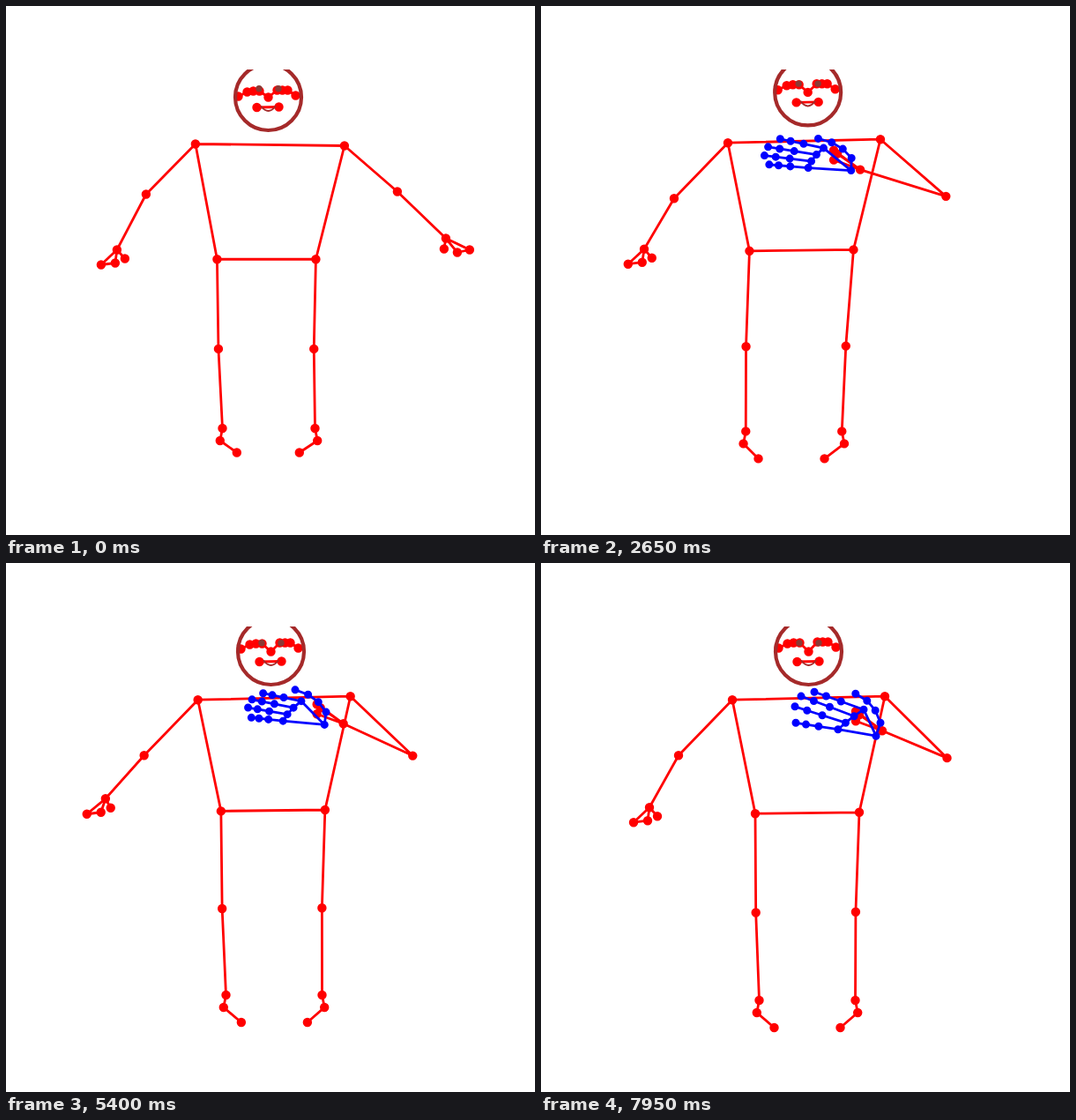
Write an HTML page that moves like this. It is 600x600 px and loops after 8 s.

```html
<!DOCTYPE html>
<html>
<head>
<meta charset="utf-8">
<style>
html, body { margin: 0; width: 100%; height: 100%; overflow: hidden; background: #fff; }
svg { display: block; width: 100vw; height: 100vh; }
path { fill: none; stroke-linecap: round; stroke-linejoin: round; }
.red { stroke: #f00; }
.blue { stroke: #00f; }
.line { stroke-width: 2.8; }
</style>
</head>
<body>
<svg viewBox="0 0 600 600">
  <clipPath id="axes"><rect x="75" y="72" width="465" height="462"/></clipPath>
  <g clip-path="url(#axes)">
    <g transform="translate(.5 .5)">
      <path id="bones" class="red line"/>
      <path id="joints" class="red" stroke-width="10.4"/>
      <g id="palm">
        <path id="fingers" class="blue line"/>
        <path id="knuckles" class="blue" stroke-width="9"/>
      </g>
      <g id="head">
        <circle r="37.5" fill="none" stroke="#a52a2a" stroke-width="4.2"/>
        <circle cx="-10.5" cy="-9.8" r="3.7" fill="#8b3a35"/>
        <circle cx="11.5" cy="-9.8" r="3.7" fill="#8b3a35"/>
        <path d="M-8 10.5Q0 20.5 8 10.5" stroke="#a52a2a" stroke-width="2"/>
      </g>
    </g>
  </g>
</svg>
<script>
const LOOP = 8000, STEP = 50, PALM_START = 1000;
const $ = id => document.getElementById(id);

const smooth = u => (u = Math.min(1, Math.max(0, u)), u * u * (3 - 2 * u));
const lerp = (a, b, u) => a + (b - a) * u;
const mix = (p, q, u) => p.map((v, i) => lerp(v, q[i], u));
const add = (p, q) => [p[0] + q[0], p[1] + q[1]];

// Eases between rows of [time, ...values].
function keys(t, rows) {
  let i = 0;
  while (i < rows.length - 2 && t >= rows[i + 1][0]) i++;
  const [a, b] = [rows[i], rows[i + 1]];
  return mix(a, b, smooth((t - a[0]) / (b[0] - a[0]))).slice(1);
}

// time, foot sway, foot drop, nose x, right wrist from shoulder, palm turn, finger length
const beats = [
  [1800, -9.5, -9, 304, -22, 33, 0, .97],
  [3600, -22, -19, 300, -24, 36, .2, .975],
  [4650, -15, -8.5, 296, -17, 38, .5, 1.02],
  [5400, 2, -6, 300, -8, 31, .35, .88],
  [6700, 4, -.5, 303, -13, 29, .75, .97],
  [7950, 0, 0, 303, -3, 39, 1, 1]
];
const raiseKeys = [[0, 0], [450, -.08], [1150, 1]];
const swingKeys = [[0, 0], [1250, .85], [1800, .05], [4650, 0], [5400, .45], [6700, 1], [7650, .9], [7950, 0]];
const flickKeys = [[3350, 0], [3550, 1], [3650, 1], [4000, 0]];

// Hand points relative to the wrist: pinky, index, thumb.
const hang = [[-18, 17], [-2, 15], [9, 10]];
const flicked = [[36, -25], [30, -14], [22, -7]];
const open = [[27, 13], [13, 16], [-2, 12]];
const folded = [[-30, -22], [-26, -18], [-30, -11]];

const brow = [[-34, -4], [-24, -9], [-17, -10], [-10, -10], [0, 0], [10, -11], [16, -11], [22, -11], [31, -5]];
const mouth = [[-13, 11.5], [12, 11]];

const arm = (shoulder, elbow, wrist, hand) => {
  const [pinky, index, thumb] = hand.map(p => add(wrist, p));
  return [shoulder, elbow, wrist, pinky, index, wrist, thumb];
};

function leg(side, shoulder, hip, ankle, lean, fresh) {
  const knee = add(mix(hip, ankle, .53), [-1.7, 0]);
  const heel = add(ankle, [side * 2.7, 14]);
  const toe = add(ankle, [-side * 17 + lean + fresh, 31 - 3.5 * fresh]);
  return [shoulder, hip, knee, ankle, heel, toe];
}

// Four straight fingers fan out over a curved row of knuckles.
function palmChains(base, q, size) {
  const rows = [0, 1, 2, 3].map(i => {
    const knuckle = [-33 + 19 * q - (9 + 2.5 * q) * i + (1.2 - .6 * q) * i * i, -25 - 5 * q + 7.5 * i];
    const tip = [
      (-84 + 14 * q - 19 * i + (5 - q) * i * i) * size,
      (-35.5 - 14.5 * q + (9.8 - 8.3 * q) * i + 3.4 * q * i * i) * size
    ];
    return [0, .46, .76, 1].map(u => add(base, mix(knuckle, tip, u)));
  });
  const thumb = [0, 1, 2, 3].map(j => add(base, [
    5 * q - (9 - 5 * q) * j - (1.3 + .5 * q) * j * j,
    -14 - q - (11.5 + 4 * q) * j + 1.5 * j * j
  ]));
  return [[base, ...thumb], [base, ...rows.map(r => r[0]), base], ...rows];
}

const poly = pts => "M" + pts.map(p => p[0].toFixed(2) + " " + p[1].toFixed(2)).join("L");
const dot = p => poly([p]) + "h.01";
function show(lineId, dotId, chains) {
  $(lineId).setAttribute("d", chains.map(poly).join(""));
  $(dotId).setAttribute("d", chains.flat().map(dot).join(""));
}

function draw(t) {
  const [sway, drop, noseX, wristX, wristY, turn, size] = keys(t, beats);
  const [raise] = keys(t, raiseKeys), [swing] = keys(t, swingKeys), [flick] = keys(t, flickKeys);
  const fresh = 1 - smooth(t / 1000);

  // Pairs of joints sit either side of a swaying spine.
  const pair = (x, y, half, tilt) => [[x - half, y - tilt], [x + half, y + tilt]];
  const [shoulderL, shoulderR] =
    pair(303 + .33 * sway - fresh, 152.7 + 4.3 * fresh, 86.5 - 2 * fresh, -2 + 3 * fresh);
  const [hipL, hipR] =
    pair(301.5 + .43 * sway - 2.5 * fresh, 283 + .47 * drop + 8 * fresh, 59 - 3 * fresh, -.7 + .7 * fresh);
  const [ankleL, ankleR] =
    pair(301.5 + sway + 5.5 * fresh, 495.5 + drop - 8 * fresh, 54.5 - 2 * fresh, 0);

  const elbowL = add(shoulderL, [-61 + 5 * fresh, 63 - 6 * fresh]);
  const low = [-33 - 24 * swing, 59 + 4 * fresh - 40 * swing * (1 - swing)];
  const wristL = add(elbowL, mix(low, [38, -24], flick));
  const handL = hang.map((p, i) => mix(add(p, [-7 * swing, swing]), flicked[i], flick));

  const out = 70.5 + 30 * Math.exp((1000 - t) / 800);
  const elbowR = add(shoulderR, mix([60, 52], [out, 62 + t / 1000], raise));
  const wristR = add(shoulderR, mix([115, 105], [wristX, wristY], raise));
  const handR = open.map((p, i) => mix(p, folded[i], raise));

  const nose = [noseX - 7 * fresh, 97 + 3 * smooth((t - 1800) / 3600) + 6 * fresh];
  const lift = [0, 1.5 * (1 - turn) + 1.5 * fresh];
  const lean = sway * .18;

  show("bones", "joints", [
    arm(shoulderL, elbowL, wristL, handL),
    arm(shoulderR, elbowR, wristR, handR),
    leg(-1, shoulderL, hipL, ankleL, lean, fresh),
    leg(1, shoulderR, hipR, ankleR, lean, fresh),
    [shoulderL, shoulderR], [hipL, hipR],
    brow.map((p, i) => add(nose, i === 4 ? p : add(p, lift))),
    mouth.map(p => add(nose, p))
  ]);
  $("head").setAttribute("transform", `translate(${nose[0]} ${nose[1]})`);

  $("palm").style.display = t >= PALM_START ? "" : "none";
  const base = add(wristR, [-7 - 120 * (1 - size), 1 + 5 * turn ** 3]);
  show("fingers", "knuckles", palmChains(base, turn, size));
}

const start = performance.now();
function tick(now) {
  const t = Math.max(0, now - start) % LOOP;
  draw(Math.floor(t / STEP) * STEP);
  requestAnimationFrame(tick);
}
draw(0);
requestAnimationFrame(tick);
</script>
</body>
</html>
```
